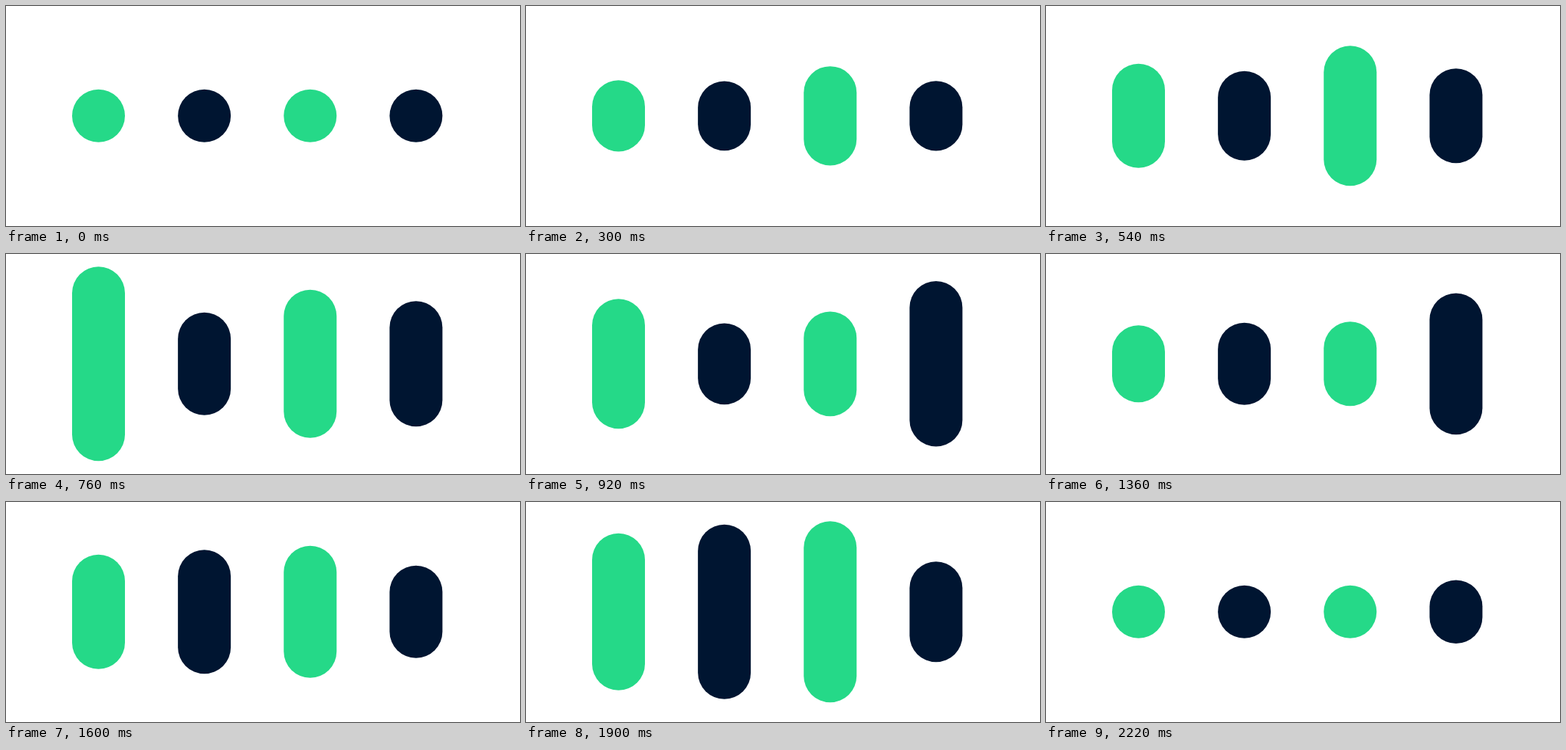
Write an HTML page with a canvas that moves like this. It is 700x300 px and loops after 2.24 s.

```html
<!DOCTYPE html>
<html lang="en">
<head>
<meta charset="utf-8">
<title>Pulsing bars</title>
<style>
  html, body { margin: 0; width: 100%; height: 100%; overflow: hidden; background: #fff; }
  canvas { display: block; }
</style>
</head>
<body>
<canvas width="700" height="300"></canvas>
<script>
const ctx = document.querySelector('canvas').getContext('2d');
const LOOP = 2240, STEP = 20, SIZE = 72, LEFT = 90, SPACING = 144.13;
const COLORS = ['#25d988', '#001531'];

// Every bar starts and ends as a circle and passes these heights at the shared beats.
const beats = [0, 540, 760, 1100, 1600, 1900, 2120, LOOP];
const bars = [
  [142, 265, SIZE, 156, 214, SIZE],
  [122, 140, 76, 169, 238, SIZE],
  [191, 202, SIZE, 180, 247, SIZE],
  [129, 171, 268, 126, 137, 269]
].map(heights => [SIZE, ...heights, SIZE]);

// Smooth tangent that is flat at peaks and valleys.
function tangent(heights, i) {
  const slope = k => (heights[k + 1] - heights[k]) / (beats[k + 1] - beats[k]);
  if (i === 0 || i === beats.length - 1) return 0;
  const before = slope(i - 1), after = slope(i);
  return before * after > 0 ? 2 * before * after / (before + after) : 0;
}

function heightAt(heights, t) {
  const i = beats.findIndex(beat => beat > t) - 1;
  const span = beats[i + 1] - beats[i], u = (t - beats[i]) / span, v = 1 - u;
  return heights[i] * v * v * (1 + 2 * u) + heights[i + 1] * u * u * (3 - 2 * u)
    + span * u * v * (v * tangent(heights, i) - u * tangent(heights, i + 1));
}

function draw(now) {
  const t = Math.floor(now % LOOP / STEP) * STEP;
  ctx.clearRect(0, 0, 700, 300);
  bars.forEach((heights, i) => {
    const height = heightAt(heights, t);
    ctx.fillStyle = COLORS[i % 2];
    ctx.beginPath();
    ctx.roundRect(LEFT + i * SPACING, (300 - height) / 2 - 0.2, SIZE, height, SIZE / 2);
    ctx.fill();
  });
}

const start = performance.now();
function tick() {
  draw(performance.now() - start);
  requestAnimationFrame(tick);
}
tick();
</script>
</body>
</html>
```
